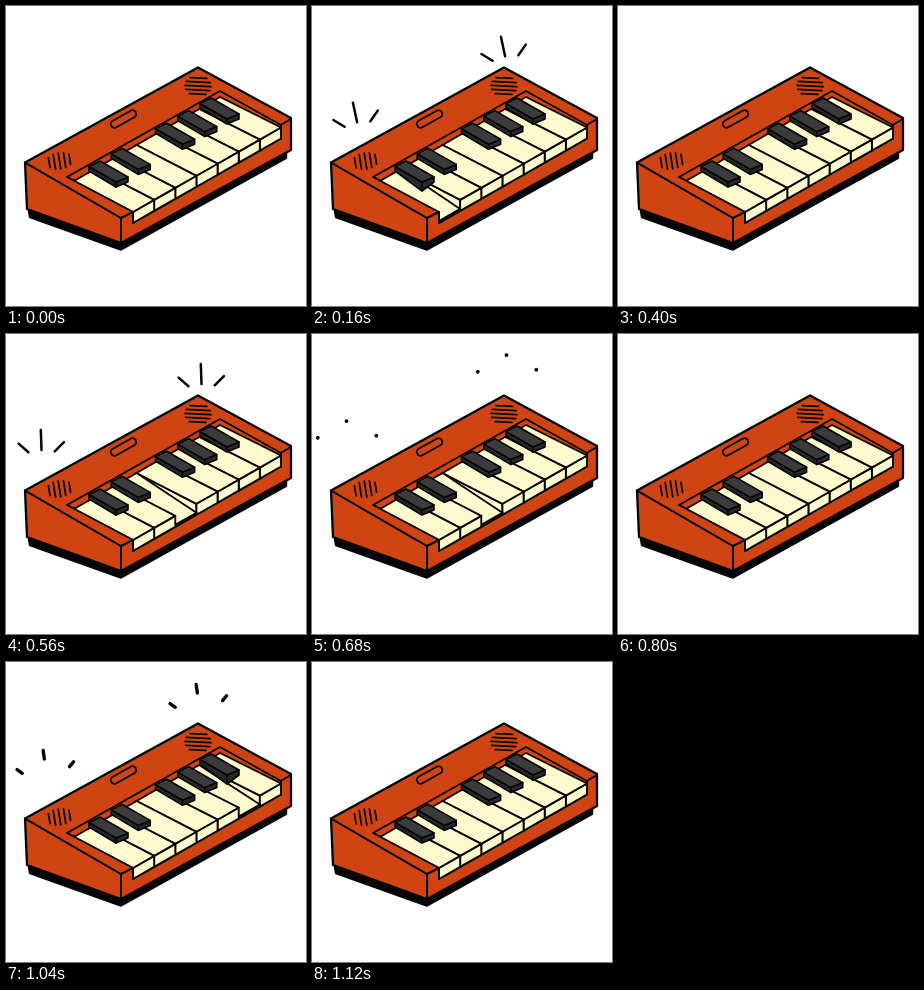
Write an HTML page with a canvas that moves like this. It is 300 px wide and 300 px high and loops after 1.2 s.

```html
<!DOCTYPE html>
<html lang="en">
<head>
<meta charset="utf-8">
<title>Toy piano</title>
<style>
html, body { margin: 0; width: 100%; height: 100%; overflow: hidden; background: #fff; }
canvas { display: block; width: 300px; height: 300px; }
</style>
</head>
<body>
<canvas id="stage" width="300" height="300"></canvas>
<script>
const ctx = document.getElementById('stage').getContext('2d');
const ORANGE = '#cf4412', CREAM = '#fefacd', INK = '#050505';
const LOOP = 1200, STEP = 40, BURST_STEPS = 4;
const KEYS = 7, FRONT_H = 11, PRESS = 9;

// tilt turns both bursts, in degrees; x is the centre of the left one.
const notes = [
  { start: 160, hold: 240, key: 0, tilt: -12, x: 48 },
  { start: 560, hold: 240, key: 2, tilt: -2, x: 36 },
  { start: 960, hold: 160, key: 5, tilt: -8, x: 43 }
];

const mix = (a, b, p) => a + (b - a) * p;
const add = ([x, y], dx, dy) => [x + dx, y + dy];
const polar = (p, angle, r) => add(p, r * Math.cos(angle), r * Math.sin(angle));
const rad = degrees => degrees * Math.PI / 180;

function shape(points, fill, width = 1.9, closed = true) {
  ctx.beginPath();
  points.forEach(([x, y]) => ctx.lineTo(x, y));
  if (closed) ctx.closePath();
  if (fill) { ctx.fillStyle = fill; ctx.fill(); }
  if (width) { ctx.lineWidth = width; ctx.stroke(); }
}

const line = (a, b, width) => shape([a, b], null, width, false);

// Divider i between white keys, at the back and at the front of the keybed.
const back = i => [mix(68, 214, i / KEYS), mix(175, 91, i / KEYS)];
const front = i => [mix(127, 275, i / KEYS), mix(206, 121.5, i / KEYS)];
const foot = i => add(front(i), 0, FRONT_H);

// Five strokes that fill a round speaker.
function speaker(centre, angle, radius, gap) {
  for (let i = -2; i <= 2; i++) {
    const middle = polar(centre, angle + Math.PI / 2, i * gap);
    const half = radius * Math.sqrt(1 - (i / 2.6) ** 2);
    line(polar(middle, angle, -half), polar(middle, angle, half), 1.8);
  }
}

function drawBody() {
  shape([[23, 205], [24, 211], [115, 243.5], [280, 152], [280, 145], [115, 236]], INK, 2.4);
  shape([[19, 156.5], [192, 61.5], [285, 112], [285, 144], [115, 237], [21, 203]], ORANGE, 2.3);
  shape([[19, 156.5], [115, 212], [285, 113]], null, 2, false);

  const slot = [[108.5, 118], [126.5, 108]];
  line(...slot, 9.4);
  ctx.strokeStyle = ORANGE;
  line(...slot, 5.6);
  ctx.strokeStyle = INK;

  speaker([53.5, 155], rad(81), 8, 5.2);
  speaker([192, 80], rad(3), 13, 4);
  shape([[61, 171], [214, 85], [275, 119], foot(KEYS), foot(0), front(0)], ORANGE);
}

function drawWhite(i, pressed) {
  const dy = pressed ? PRESS : 0;
  const left = add(front(i), 0, dy), right = add(front(i + 1), 0, dy);
  shape([back(i), left, foot(i)], CREAM);
  shape([left, right, foot(i + 1), foot(i)], CREAM);
  shape([back(i), back(i + 1), right, left], CREAM);
}

function drawCheek() {
  shape([[19, 156.5], [61, 171], front(0), foot(0), [115, 222], [115, 212]], ORANGE, 0);
  shape([[19, 156.5], [115, 212], front(0), foot(0)], null, 2, false);
  line([61, 171], front(0));
  line([115, 212], [115, 237], 2);
}

function drawBlack(i, exposed) {
  const corner = [99.8 + 22.2 * i, 188.6 - 12.6 * i];
  const at = (dx, dy) => add(corner, dx, dy);
  const bottom = exposed ? 9 : 5;
  shape([at(-39, -15.5), at(-39, -11), at(-12, bottom), at(0, 0), at(0, -5), at(-12, 0)], '#27282a', 1.6);
  line(at(-12, 0), at(-12, bottom), 1.4);
  shape([at(-39, -15.5), at(-28, -21), at(0, -5), at(-12, 0)], '#3a3b3d', 1.6);
}

// Three rays that fly outward and shrink to dots.
function drawBurst(centre, tilt, p) {
  for (let k = -1; k <= 1; k++) {
    const angle = rad(tilt + 47 * k - 90);
    const reach = k ? 31 : 34, length = k ? 13 : 20;
    const tip = reach + 9 * p * (2 - p);
    const tail = mix(reach - length, reach + 9, p) - 0.02;
    line(polar(centre, angle, tail), polar(centre, angle, tip), mix(2.5, 3.8, p));
  }
}

function draw(time) {
  const t = time % LOOP;
  const note = notes.find(n => t >= n.start && t < n.start + n.hold);
  const key = note ? note.key : -1;

  ctx.fillStyle = '#fff';
  ctx.fillRect(0, 0, 300, 300);
  ctx.strokeStyle = INK;
  ctx.lineCap = ctx.lineJoin = 'round';

  drawBody();
  for (let i = KEYS - 1; i >= 0; i--) drawWhite(i, i === key);
  drawCheek();
  [6, 5, 4, 2, 1].forEach(i => drawBlack(i, i === key + 1));

  if (!note) return;
  const step = Math.floor((t - note.start) / STEP);
  if (step >= BURST_STEPS) return;
  const p = step / (BURST_STEPS - 1);
  drawBurst([note.x, 130], note.tilt, p);
  drawBurst([196, 64], note.tilt, p);
}

const begin = performance.now();
function tick() {
  draw(performance.now() - begin);
  requestAnimationFrame(tick);
}
tick();
</script>
</body>
</html>
```
